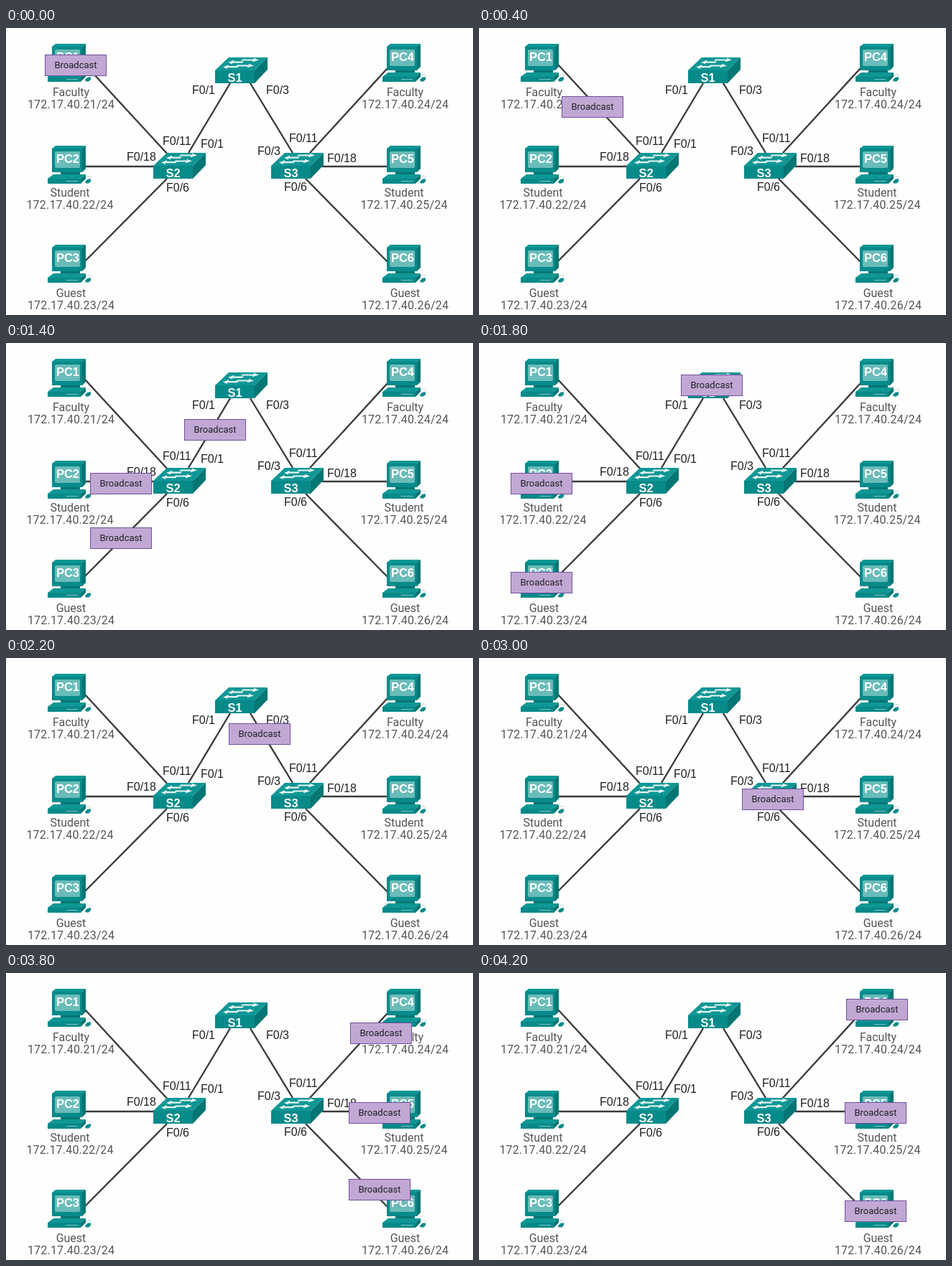
An HTML page for the animation above (5000 ms loop, 650x400 px).

```html
<!DOCTYPE html>
<html lang="en">
<head>
<meta charset="utf-8">
<title>Broadcast in a switched network</title>
<style>
  html, body { margin: 0; width: 100%; height: 100%; overflow: hidden; background: #fefefe; }
  svg { display: block; }
  text { text-anchor: middle; }
  .wire { stroke: #3b3b3d; stroke-width: 2.4; }
  .name, .ip { font: 16px Roboto, sans-serif; fill: #555557; }
  .ip { letter-spacing: .2px; }
  .port { font: 16px "Liberation Sans", Arial, sans-serif; fill: #202022; text-anchor: start; }
  .tag { font: bold 16.5px "Liberation Sans", Arial, sans-serif; fill: #fff; }
  .face { fill: #078a8a; }
  .top { fill: #0f9795; }
  .side { fill: #047674; }
  .box rect { fill: #c1a8d4; stroke: #71519b; }
  .box text { font: 13px Roboto, sans-serif; fill: #202022; }
</style>
</head>
<body>
<svg id="stage" width="650" height="400" viewBox="0 0 650 400">
  <defs>
    <g id="pc">
      <path class="side" d="M76 58H103V65H76Z"/>
      <path class="top" d="M58 68L66 62H111L104 68Z"/>
      <path class="face" d="M58 68H104V75H58Z"/>
      <path class="side" d="M104 68L111 62V68L104 75Z"/>
      <path d="M84 71.5H100" stroke="#7cc5c2"/>
      <path class="top" d="M64 26L69 22H111L106 26Z"/>
      <path class="face" d="M64 26H106V59H64Z"/>
      <path class="side" d="M106 26L111 22V54L106 59Z"/>
      <rect x="68" y="30" width="35" height="23" rx="2" fill="#69bcb9"/>
      <path d="M111 66C116 63 121 65 117 69" fill="none" stroke="#b9c9d4" stroke-width=".8"/>
      <path class="face" d="M110 72L114 68.5H118V72L115 74.5H111Z"/>
    </g>
    <g id="switch">
      <path class="top" d="M291 59L310 41H364L346 59Z"/>
      <path class="face" d="M291 59H346V77H291Z"/>
      <path class="side" d="M346 59L364 41V58L346 77Z"/>
      <g fill="#e4f3f2">
        <path id="right" d="M329 43.5H345V41.8L352 44.5L343 47.2V45.5H327Z"/>
        <use href="#right" x="-7" y="8"/>
        <path id="left" d="M331 46.5H317V44.8L309 48L315 50.5V48.8H329Z"/>
        <use href="#left" x="-7" y="6.5"/>
      </g>
    </g>
  </defs>
</svg>
<script>
const stage = document.getElementById('stage');
const LOOP = 5000, STEP = 200;

function add(parent, tag, attrs, label) {
  const el = document.createElementNS(stage.namespaceURI, tag);
  for (const key in attrs) el.setAttribute(key, attrs[key]);
  if (label) el.textContent = label;
  parent.append(el);
  return el;
}
const write = (type, label, x, y) => add(stage, 'text', { class: type, x, y }, label);

[
  [110, 51, 226, 177], [110, 193, 207, 193], [110, 325, 224, 210],
  [312, 77, 254, 174], [340, 77, 399, 174],
  [531, 56, 423, 174], [440, 193, 531, 193], [417, 210, 531, 326]
].forEach(([x1, y1, x2, y2]) => add(stage, 'line', { class: 'wire', x1, y1, x2, y2 }));

['Faculty', 'Student', 'Guest'].forEach((group, row) => {
  const y = [0, 142, 280][row];
  [0, 1].forEach(col => {
    const n = col * 3 + row + 1, x = col * 466;
    const mid = 90.5 + col * 465 - (row === 1 ? 1.5 : 0);
    add(stage, 'use', { href: '#pc', x, y });
    write('tag', 'PC' + n, 86 + x, 46 + y);
    write('name', group, mid, 95 + row * 140);
    write('ip', `172.17.40.2${n}/24`, mid, 112 + row * 140);
  });
});

[[0, 0], [-86, 133], [78, 133]].forEach(([x, y], i) => {
  add(stage, 'use', { href: '#switch', x, y });
  write('tag', 'S' + (i + 1), 318.5 + x, 75 + y);
});

[
  ['F0/1', 259, 92], ['F0/3', 362, 92],
  ['F0/11', 218, 163], ['F0/1', 271, 167], ['F0/18', 168, 185], ['F0/6', 223, 228],
  ['F0/11', 394, 159], ['F0/3', 350, 177], ['F0/18', 447, 187], ['F0/6', 387, 227]
].forEach(port => write('port', ...port));

// start, arrival, removal, then from x, y and to x, y
const trips = [
  [0, 1000, 1000, 54, 37, 206, 181],
  [1000, 1730, 1950, 207, 181, 281, 44],
  [1000, 1730, 1950, 206, 181, 44, 319],
  [1000, 1730, 1950, 205, 180, 44, 181],
  [1950, 2685, 3000, 281, 44, 366, 182],
  [3000, 4030, LOOP, 366, 182, 511, 36],
  [3000, 4030, LOOP, 366, 182, 509, 180],
  [3000, 4030, LOOP, 366, 182, 509, 317]
].map(trip => {
  const box = add(stage, 'g', { class: 'box' });
  add(box, 'rect', { x: .5, y: .5, width: 85, height: 29 });
  add(box, 'text', { x: 43, y: 19 }, 'Broadcast');
  return { box, trip };
});

function draw(now) {
  const t = Math.floor(now % LOOP / STEP) * STEP;
  for (const { box, trip: [start, arrive, end, x0, y0, x1, y1] } of trips) {
    const p = Math.max(0, Math.min(1, (t - start) / (arrive - start)));
    const x = Math.round(x0 + (x1 - x0) * p), y = Math.round(y0 + (y1 - y0) * p);
    box.setAttribute('transform', `translate(${x} ${y})`);
    box.setAttribute('visibility', t >= start && t < end ? 'visible' : 'hidden');
  }
}

const begin = performance.now();
function tick() {
  draw(performance.now() - begin);
  requestAnimationFrame(tick);
}
tick();
</script>
</body>
</html>
```
